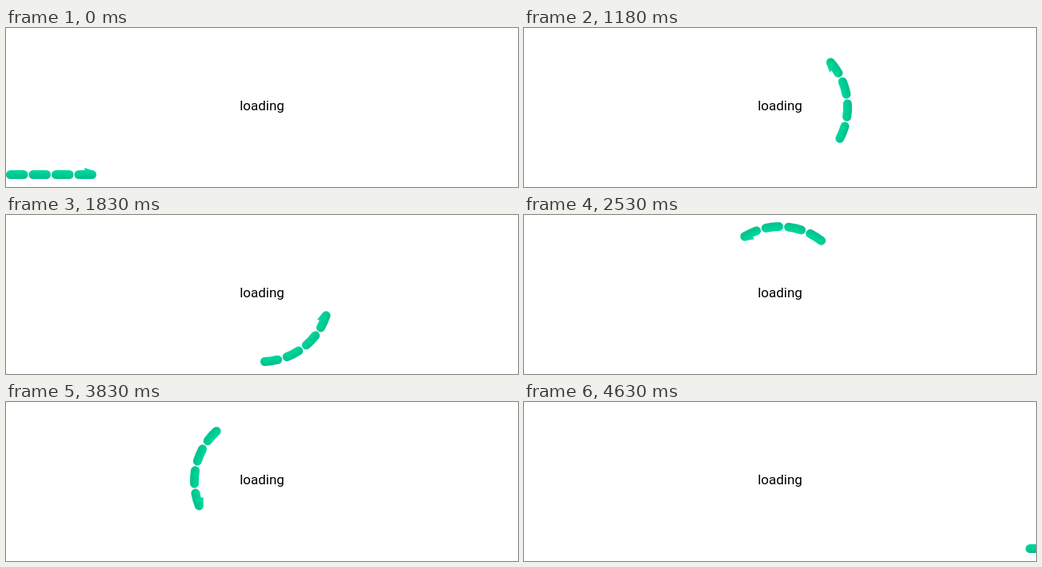
Recreate the animation shown at these times as an HTML page with a canvas. Size 640 by 199 pixels, loop 4730 ms.

```html
<!DOCTYPE html>
<html lang="en">
<head>
<meta charset="utf-8">
<title>loading</title>
<style>
  html, body { margin: 0; width: 100%; height: 100%; overflow: hidden; background: #fff; }
  canvas { position: absolute; left: 0; top: 0; display: block; }
  p {
    position: absolute; left: 0; top: 87px; width: 640px; margin: 0;
    font: 400 17px/20px Roboto, "Open Sans", sans-serif;
    text-align: center; color: #000;
  }
</style>
</head>
<body>
<canvas id="stage" width="640" height="199"></canvas>
<p>loading</p>
<script>
const ctx = document.getElementById('stage').getContext('2d');
const LOOP = 4730;
const CX = 320, CY = 99, R = 84.5, LINE_Y = CY + R;
const LAP = 2 * Math.PI * R;
const EXIT = CX + LAP;
const DASHES = 4, DASH = 16.5, PITCH = 28.5, WIDTH = 11;

function shade(gradient) {
  gradient.addColorStop(0, '#00d89c');
  gradient.addColorStop(1, '#00c08c');
  return gradient;
}
const lineShade = shade(ctx.createLinearGradient(0, 178, 0, 189));
const ringShade = shade(ctx.createRadialGradient(CX, CY, R - 5.5, CX, CY, R + 5.5));

const lerp = (a, b, u) => a + (b - a) * u;
const onRing = s => s > CX && s < EXIT;
const onArc = degrees => CX + degrees * Math.PI / 180 * R;

// Point at distance s along line, ring, line; inset moves it towards the centre.
function place(s, inset = 0) {
  if (!onRing(s)) return [s < EXIT ? s : s - LAP, LINE_Y - inset];
  const a = (s - CX) / R;
  return [CX + (R - inset) * Math.sin(a), CY + (R - inset) * Math.cos(a)];
}

// The middle part runs on a shorter step time.
function stepAt(t) {
  if (t < 900) return Math.floor(t / 100);
  if (t < 1530) return 9 + Math.floor((t - 900) / 70);
  return 18 + Math.floor((t - 1530) / 100);
}

// Steady turn, then double speed for the last part of each round.
const turn = k => onArc(2.3 + 20 * k + 20 * Math.max(0, k - 7));

function tailAt(step) {
  const leave = EXIT + 12.5;
  if (step <= 7) return 5.5 + 30 * step;
  if (step < 10) return lerp(215.5, turn(0), (step - 7) / 3);
  if (step <= 42) return turn((step - 10) % 11);
  if (step < 44) return lerp(turn(10), leave, (step - 42) / 2);
  return leave + 60 * (step - 44);
}

function drawDash(s) {
  ctx.strokeStyle = onRing(s + DASH / 2) ? ringShade : lineShade;
  ctx.beginPath();
  ctx.moveTo(...place(s));
  ctx.lineTo(...place(s + DASH / 2));
  ctx.lineTo(...place(s + DASH));
  ctx.stroke();
}

function drawBarb(s) {
  ctx.fillStyle = onRing(s) ? ringShade : lineShade;
  ctx.beginPath();
  ctx.moveTo(...place(s - 9.5, 8.5));
  ctx.lineTo(...place(s + 3, 4.6));
  ctx.lineTo(...place(s - 8, 2));
  ctx.fill();
}

function draw(t) {
  const tail = tailAt(stepAt(t));
  ctx.fillStyle = '#fff';
  ctx.fillRect(0, 0, 640, 199);
  ctx.lineWidth = WIDTH;
  ctx.lineCap = 'round';
  ctx.lineJoin = 'round';
  for (let i = 0; i < DASHES; i++) drawDash(tail + i * PITCH);
  drawBarb(tail + (DASHES - 1) * PITCH + DASH);
}

const start = performance.now();
function tick() {
  draw((performance.now() - start) % LOOP);
  requestAnimationFrame(tick);
}
tick();
</script>
</body>
</html>
```
